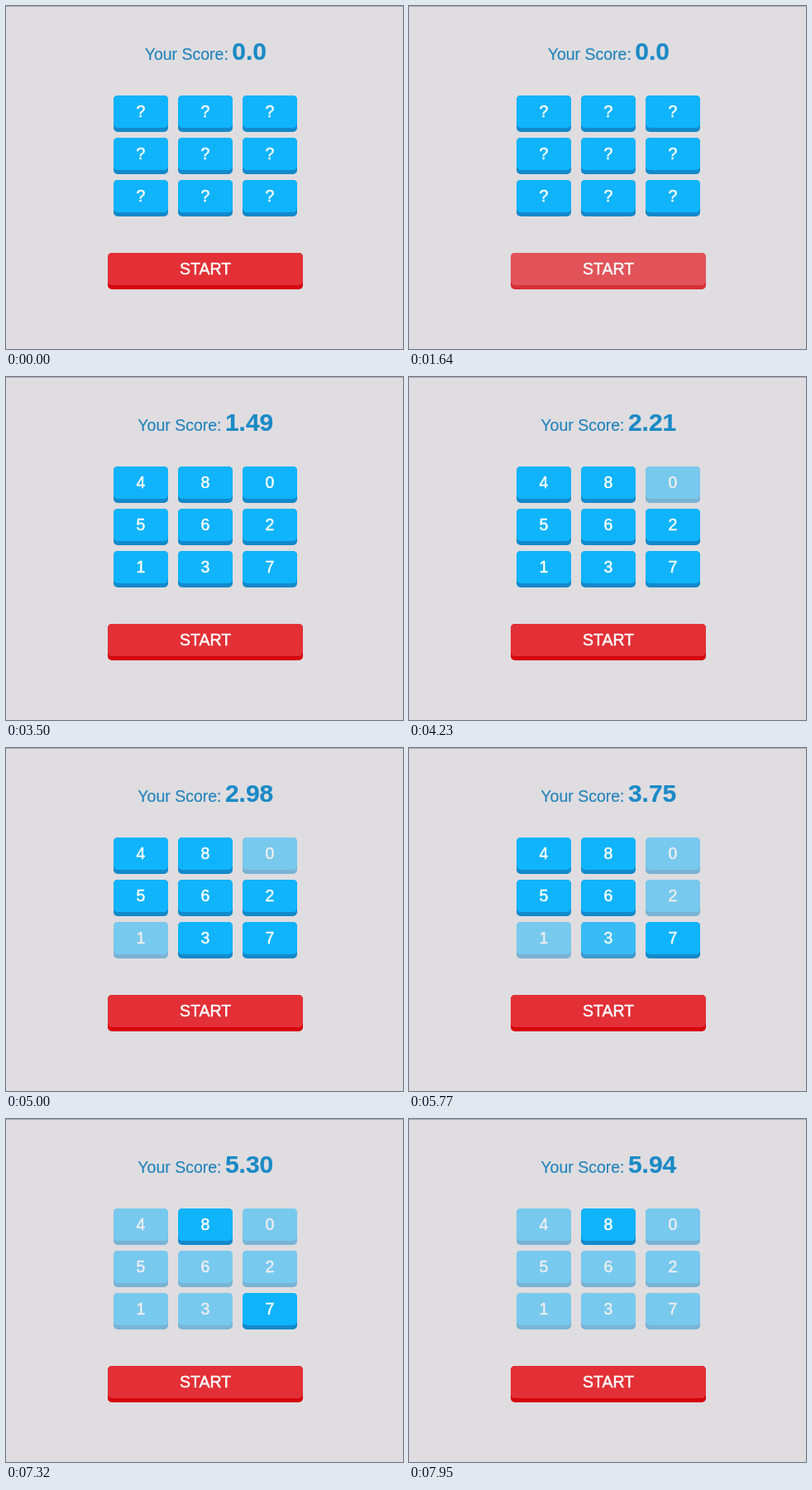
Recreate the animation shown at these times as an HTML page with a canvas. Size 480 px wide and 414 px high, loop 8000 ms.

```html
<!DOCTYPE html>
<html lang="en">
<head>
<meta charset="utf-8">
<title>Number tapping game</title>
<style>
  html, body { margin: 0; width: 100%; height: 100%; overflow: hidden; background: #dfdde0; }
  canvas { display: block; }
</style>
</head>
<body>
<canvas id="stage" width="480" height="414"></canvas>
<script>
const ctx = document.getElementById('stage').getContext('2d');
const FONT = '"Liberation Sans", Arial, sans-serif';
const LOOP = 8000;
const STEP = 1000 / 22;

const BG = [223, 221, 224];
const WHITE = [255, 255, 255];
const BLUE = { face: [16, 180, 252], edge: [18, 137, 202] };
const RED = { face: [226, 48, 54], edge: [214, 4, 12] };

const GAME_START = 2050;
const HOVER_START = [450, 3150];
const digits = [4, 8, 0, 5, 6, 2, 1, 3, 7];
// Moment at which each digit is tapped, in counting order.
const taps = [3900, 4700, 5320, 5900, 6400, 6950, 7270, 7730];
const HOVER_LEAD = 130;
const SWEEP = { digit: 2, from: 3590, to: 3690 };

// Stopwatch readings: [time in ms, seconds shown].
const clock = [[GAME_START, 0], [2454.5, 0.38], [3500, 1.49], [5000, 2.98], [6636.4, 4.62], [7954.5, 5.94]];

function scoreAt(t) {
  if (t < GAME_START) return '0.0';
  let i = 1;
  while (i < clock.length - 1 && t > clock[i][0]) i++;
  const [t0, s0] = clock[i - 1];
  const [t1, s1] = clock[i];
  return (s0 + (s1 - s0) * (t - t0) / (t1 - t0)).toFixed(2);
}

// Colour over the background at the given opacity.
function fade(color, alpha) {
  return `rgb(${color.map((c, i) => Math.round(BG[i] + (c - BG[i]) * alpha))})`;
}

function box(x, y, w, h, fill) {
  ctx.fillStyle = fill;
  ctx.beginPath();
  ctx.roundRect(x, y, w, h, 5);
  ctx.fill();
}

function text(str, x, y, size, color, weight, stroke) {
  ctx.font = `${weight} ${size}px ${FONT}`;
  ctx.fillStyle = ctx.strokeStyle = color;
  ctx.lineWidth = stroke;
  ctx.lineJoin = 'round';
  ctx.fillText(str, x, y);
  ctx.strokeText(str, x, y);
}

function button(x, y, w, label, colors, alpha) {
  box(x, y, w, 44, fade(colors.edge, alpha));
  box(x, y, w, 39, fade(colors.face, alpha));
  ctx.textAlign = 'center';
  text(label, x + w / 2, y + 26, 19.5, fade(WHITE, alpha), 'normal', 0.5);
}

function padAlpha(digit, t) {
  const tap = taps[digit];
  if (t >= tap) return 0.5;
  const swept = digit === SWEEP.digit && t >= SWEEP.from && t < SWEEP.to;
  return swept || t >= tap - HOVER_LEAD ? 0.8 : 1;
}

function drawScore(t) {
  const label = 'Your Score:';
  const value = scoreAt(t);
  const gap = 4.4;
  ctx.font = `19.5px ${FONT}`;
  const labelWidth = ctx.measureText(label).width;
  ctx.font = `bold 30px ${FONT}`;
  const total = labelWidth + gap + ctx.measureText(value).width;
  const x = 241.3 - total / 2;
  ctx.textAlign = 'left';
  text(label, x, 64.5, 19.5, '#2585bc', 'normal', 0.2);
  text(value, x + labelWidth + gap, 65, 30, '#1b8ac6', 'bold', 0.2);
}

function draw(t) {
  ctx.fillStyle = fade(BG, 1);
  ctx.fillRect(0, 0, 480, 414);
  ctx.fillStyle = '#aaa9ab';
  ctx.fillRect(0, 0, 480, 1);

  drawScore(t);
  digits.forEach((digit, i) => {
    const x = 130 + (i % 3) * 78;
    const y = 108 + Math.floor(i / 3) * 51;
    button(x, y, 66, t < GAME_START ? '?' : String(digit), BLUE, padAlpha(digit, t));
  });
  const hovered = t >= HOVER_START[0] && t < HOVER_START[1];
  button(123, 298, 236, 'START', RED, hovered ? 0.8 : 1);
}

const origin = performance.now();
function tick() {
  const t = (performance.now() - origin) % LOOP;
  // The screen refreshes 22 times a second, on 10 ms boundaries.
  draw(Math.floor((t + 5) / STEP) * STEP);
  requestAnimationFrame(tick);
}
tick();
</script>
</body>
</html>
```
